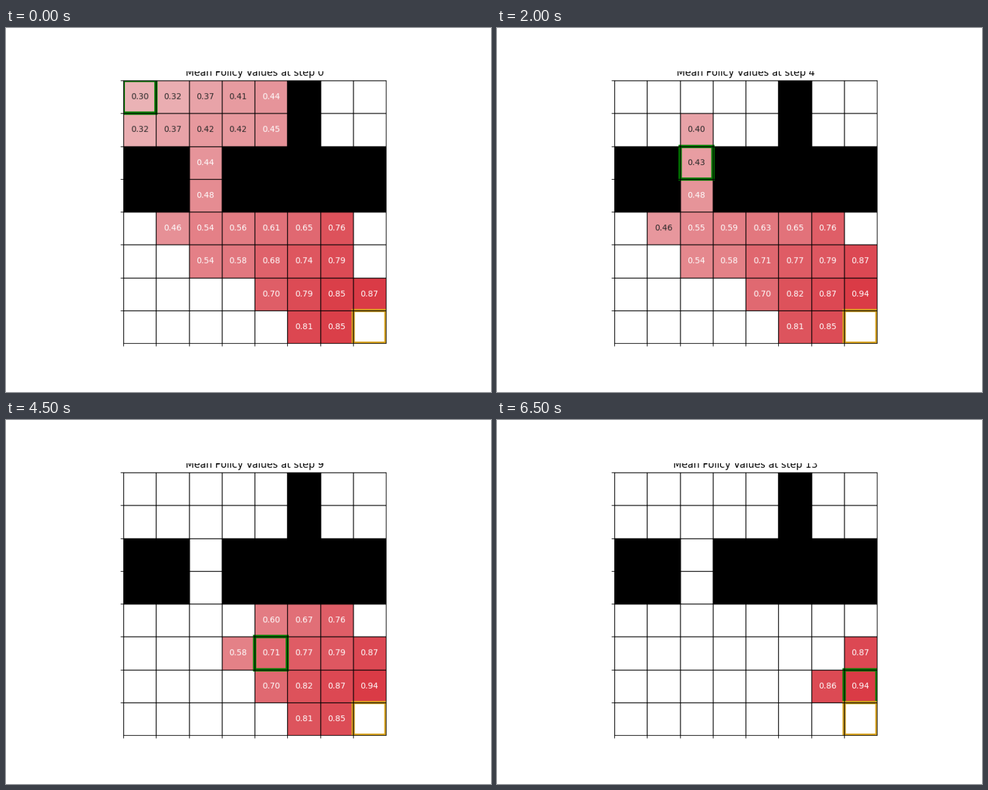
Recreate the animation shown at these times as a matplotlib script. Size 864 by 648 pixels, loop 7000 ms.

```python
import numpy as np
import matplotlib.pyplot as plt
from matplotlib.animation import FuncAnimation
from matplotlib.colors import LinearSegmentedColormap
from matplotlib.patches import Rectangle

W, H = 864, 648            # stage
PW, PH = 640, 480          # plot, enlarged by ZOOM onto the stage
ZOOM = 1.0395
PX, PY = (W - PW) // 2, (H - PH) // 2
LEFT, TOP = 110.16, 77.76  # corner of the enlarged plot
N = 8

START, MOVES = (0, 0), "DRRDDDRRDRDRR"
GOAL = (7, 7)
WALLS = [(0, 5), (1, 5)] + [(r, c) for r in (2, 3) for c in range(N) if c != 2]

# First values of each row in hundredths, after the column they begin in.
FIRST = [
    (0, 30, 32, 37, 41, 44),
    (0, 32, 37, 42, 42, 45),
    (2, 44),
    (2, 48),
    (1, 46, 54, 56, 61, 65, 76),
    (2, 54, 58, 68, 74, 79),
    (4, 70, 79, 85, 87),
    (5, 81, 85),
]

# Updates by step: (row, first column, values...), 0 clears a cell.
UPDATES = {
    1: [(0, 0, 29, 33, 37, 0, 0), (1, 0, 31, 35, 40, 41, 0),
        (4, 2, 56, 59, 63), (5, 4, 71, 77, 79, 87), (6, 5, 82, 87, 94)],
    3: [(2, 2, 43)],
    4: [(1, 3, 0), (4, 2, 55)],
    5: [(3, 2, 46), (4, 2, 54, 58, 62)],
    6: [(4, 3, 57)],
    7: [(5, 2, 0)],
    8: [(4, 4, 60, 67)],
    11: [(5, 5, 73, 81)],
    12: [(6, 6, 86), (7, 5, 0)],
    13: [(7, 6, 0)],
}

REDS = LinearSegmentedColormap.from_list("reds", ["#f3f0f0", "#da3b46"])


def agent_at(step):
    done = MOVES[:step]
    return START[0] + done.count("D"), START[1] + done.count("R")


def values_at(step):
    grid = np.zeros((N, N))
    runs = [(row, *run) for row, run in enumerate(FIRST)]
    for s in range(1, step + 1):
        runs += UPDATES.get(s, [])
    for row, col, *vals in runs:
        grid[row, col:col + len(vals)] = np.array(vals) / 100
    # cells more than one move behind the agent are dropped
    rows, cols = np.indices(grid.shape)
    ahead = (rows + cols >= step - 1) & (rows >= agent_at(step)[0] - 1)
    return grid * ahead


def weights(size, start, count):
    """Hanning interpolation from count plot pixels to size stage pixels."""
    pos = (np.arange(size) + 0.5 - start) / ZOOM - 0.5
    gap = np.clip(pos, 0, count - 1)[:, None] - np.arange(count)
    return np.where(abs(gap) < 1, 0.5 + 0.5 * np.cos(np.pi * gap), 0)


ROWS, COLS = weights(H, TOP, PH), weights(W, LEFT, PW)


def enlarge(img, dpi):
    plot = img[PY:PY + PH, PX:PX + PW]
    out = np.einsum("yi,ijc,xj->yxc", ROWS, plot, COLS, optimize=True)
    out[:int(TOP)] = 1
    return np.uint8(np.clip(out, 0, 1) * 255 + 0.5), 0, 0


def cell(pos, **style):
    ax.add_patch(Rectangle((pos[1], pos[0]), 1, 1, **style))


def draw(step):
    ax.clear()
    grid = values_at(step)
    ratio = grid / grid.max()
    ax.pcolormesh(np.ma.masked_equal(ratio, 0), cmap=REDS, vmin=0, vmax=1)
    for row, col in np.argwhere(grid > 0):
        color = "w" if ratio[row, col] > 0.5 else ".15"
        ax.text(col + 0.5, row + 0.5, f"{grid[row, col]:.2f}",
                color=color, ha="center", va="center")
    for wall in WALLS:
        cell(wall, color="black")
    cell(agent_at(step), fill=False, edgecolor="green", lw=4)
    cell(GOAL, fill=False, edgecolor="goldenrod", lw=4)

    ax.set(xlim=(0, N), ylim=(N, 0), xticks=range(N), yticks=range(N))
    ax.set_xticklabels([])
    ax.set_yticklabels([])
    ax.grid(color="black", lw=1)
    ax.set_title(f"Mean Policy Values at step {step}")


plt.rcParams.update({"font.family": "DejaVu Sans", "font.size": 10})
fig = plt.figure(figsize=(W / 100, H / 100), dpi=100, facecolor="white")
fig.set_agg_filter(enlarge)
ax = fig.add_axes([(PX + 95) / W, (PY + 15) / H, 450 / W, 450 / H])

anim = FuncAnimation(fig, draw, frames=len(MOVES) + 1,
                     init_func=lambda: draw(0),
                     interval=500, repeat=True, repeat_delay=0)
plt.show()
```
